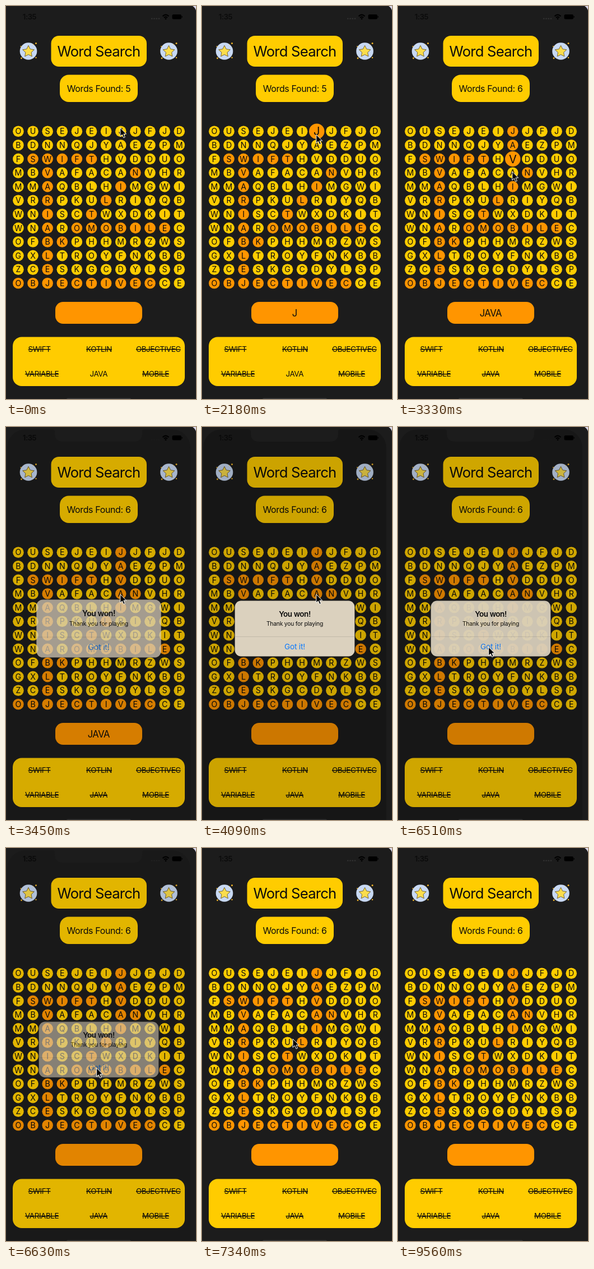
Recreate the animation shown at these times as an HTML page. Size 339 px wide and 700 px high, loop 9.61 s.

```html
<!DOCTYPE html>
<html lang="en">
<head>
<meta charset="utf-8">
<title>Word Search</title>
<style>
html, body { margin: 0; width: 100%; height: 100%; overflow: hidden; background: #1c1c1c; }
svg { display: block; width: 339px; height: 700px; }
text { font-family: Inter, "Liberation Sans", sans-serif; text-anchor: middle; letter-spacing: -.03em; fill: #0b0b0b; }
.struck { text-decoration: line-through; }
</style>
</head>
<body>
<svg id="stage" viewBox="0 0 339 700"></svg>
<script>
const LOOP = 9610, YELLOW = '#ffcc00', ORANGE = '#ff9500';
const stage = document.getElementById('stage');

function add(tag, attrs, parent = stage) {
  const el = document.createElementNS('http://www.w3.org/2000/svg', tag);
  for (const k in attrs) el.setAttribute(k, attrs[k]);
  parent.append(el);
  return el;
}
const box = (x, y, width, height, rx, fill, parent) => add('rect', {x, y, width, height, rx, fill}, parent);
function label(str, x, y, size, attrs = {}, parent) {
  const el = add('text', {x, y, 'font-size': size, ...attrs}, parent);
  el.textContent = str;
  return el;
}
const clamp = v => Math.max(0, Math.min(1, v));
const ramp = (t, start, length) => clamp((t - start) / length);
const smooth = p => p * p * (3 - 2 * p);

// Phone frame and status bar
add('path', {d: 'M333 0H339V8Q337.5 3 333 0Z', fill: '#d9d5e6'});
label('1:35', 42, 23.5, 13, {'font-weight': 600});
const signal = add('g', {fill: '#333'});
for (let i = 0; i < 4; i++) box(259 + i * 4.2, 21.5, 2.6, 2, .6, '#333', signal);
add('path', {d: 'M279.5 18.2Q285 13 290.5 18.2M282 20.8Q285 18 288 20.8', fill: 'none', stroke: '#000', 'stroke-width': 2});
add('circle', {cx: 285, cy: 22.8, r: 1.4});
box(296.5, 15, 16.5, 8.6, 2.5, '#000');
box(313.6, 17.8, 1.3, 3, .6, '#000');
box(108, 698.5, 115, 4, 2, '#3a3a3a');

// Star badges
function badge(x) {
  const g = add('g', {transform: `translate(${x} 80.5)`});
  add('circle', {r: 15.3, fill: '#c8d9f3'}, g);
  const pts = [...Array(10).keys()].map(i => {
    const a = i * Math.PI / 5 - Math.PI / 2, r = i % 2 ? 5.4 : 10.8;
    return [r * Math.cos(a), r * Math.sin(a) + .6].map(v => v.toFixed(1));
  });
  add('polygon', {points: pts.join(' '), fill: '#fbdd4c', stroke: '#6b5a2c', 'stroke-width': .9, 'stroke-linejoin': 'round'}, g);
  [[13.5, -14, 1.5], [-13.5, -8.5, 1], [-12.5, 12.5, 1.4], [13.5, 11.5, 1.2], [9, -12, .8]]
    .forEach(([cx, cy, r]) => add('circle', {cx, cy, r, fill: '#f0b429'}, g));
}
badge(40);
badge(290.5);

// Panels
box(80.5, 53, 170.5, 55, 14, YELLOW);
label('Word Search', 165.5, 90, 25.6);
box(96, 122.5, 139, 48.5, 16, YELLOW);
const score = label('', 165.5, 152.5, 15.9, {style: 'letter-spacing:-.02em'});
box(88, 527, 155, 39, 14, ORANGE);
const typed = label('', 165.3, 552.6, 16.6);
box(12, 589.5, 307, 87.5, 16, YELLOW);
const words = [['SWIFT', 59.5, 616], ['KOTLIN', 166, 616], ['OBJECTIVEC', 271.8, 616],
  ['VARIABLE', 64, 660], ['MOBILE', 267, 660], ['JAVA', 165.3, 660]]
  .map(([w, x, y]) => label(w, x, y, 13.4, {class: 'struck'}));
const java = words[5];

// Letter grid
const rows = `OUSEJEIJJFJD BDNNQJYAEZPM FSWIFTHVDDUO MBVAFACANVHR MMAQBLHIMGWI VRRPKULRIYQB
WNISCTWXDKIT WNAROMOBILEC OFBKPHHMRZWS GXLTROYFNKBB ZCESKGCDYLSP OBJECTIVECCE`.split(/\s+/);
const cells = rows.map((row, r) => [...row].map((ch, c) => {
  const x = 21.9 + c * 26.12, y = 223.2 + r * 24.6;
  const g = add('g', {});
  const disc = add('circle', {r: 9.8, fill: YELLOW}, g);
  label(ch, 0, 5.1, 14.2, {style: 'letter-spacing:0'}, g);
  const scale = s => g.setAttribute('transform', `translate(${x} ${y}) scale(${s})`);
  scale(1);
  return {disc, scale};
}));
// Words found so far: row, column, row step, column step, length
[[2, 1, 0, 1, 5], [3, 2, 1, 0, 8], [8, 3, -1, 1, 6], [7, 4, 0, 1, 7], [11, 0, 0, 1, 10]]
  .forEach(([r, c, dr, dc, n]) => {
    for (let i = 0; i < n; i++) cells[r + i * dr][c + i * dc].disc.setAttribute('fill', ORANGE);
  });

// Dimming of the screen around the notch
const shade = add('path', {d: 'M2 700V37A33 33 0 0 1 35 4H83q4 0 4 4v3q0 15 15 15H228q15 0 15-15v-3q0-4 4-4H296A33 33 0 0 1 329 37V700Z'});

// Alert
const alertBox = add('g', {});
box(58.7, 309.5, 213.6, 99, 11, '#dbd1be', alertBox);
const press = add('path', {d: 'M58.7 373.5H272.3V397.5a11 11 0 0 1-11 11H69.7a11 11 0 0 1-11-11Z', fill: '#000', 'fill-opacity': .06}, alertBox);
box(58.7, 373.2, 213.6, .7, 0, '#b9b1a2', alertBox);
label('You won!', 165.5, 338.3, 13.45, {'font-weight': 600}, alertBox);
label('Thank you for playing', 165.5, 354, 10.3, {style: 'letter-spacing:-.02em'}, alertBox);
label('Got it!', 165.5, 395.8, 13.6, {style: 'fill:#0a7aff;letter-spacing:-.015em'}, alertBox);

const pointer = add('path', {d: 'M0 0V15.2L3.5 12 6 17.6 8.5 16.5 6.1 11H10.8Z', fill: '#000', stroke: '#fff', 'stroke-width': 1, 'stroke-linejoin': 'round'});
// Pointer stops: time, x, y
const stops = [[0, 203.8, 217], [1800, 203.8, 217], [3330, 203.8, 295], [3450, 203.8, 298],
  [4090, 203.8, 298], [4650, 158, 407], [4910, 161, 401], [5870, 161, 401], [6150, 161.7, 392],
  [7339, 161.7, 392], [7340, 162, 340], [7820, 80, 0], [8120, 80, 0], [8420, 236, 702], [LOOP, 236, 702]];

function pointerAt(t) {
  const i = stops.findIndex(s => s[0] > t);
  const [t0, x0, y0] = stops[i - 1], [t1, x1, y1] = stops[i];
  const p = smooth(ramp(t, t0, t1 - t0));
  return [x0 + (x1 - x0) * p, y0 + (y1 - y0) * p];
}

// Each letter stays enlarged until the next one is picked
const picks = [1860, 2310, 2800, 3380];
const SOLVED = 3300, CLEARED = 3850;

function draw(t) {
  const solved = t >= SOLVED;
  score.textContent = 'Words Found: ' + (solved ? 6 : 5);
  java.setAttribute('class', solved ? 'struck' : '');
  const count = solved ? 4 : picks.filter(p => t >= p).length;
  typed.textContent = t < CLEARED ? 'JAVA'.slice(0, count) : '';

  picks.forEach((start, r) => {
    const cell = cells[r][7];
    cell.disc.setAttribute('fill', t >= start ? ORANGE : YELLOW);
    const next = picks[r + 1];
    cell.scale(next ? 1 + .4 * (ramp(t, start, 120) - ramp(t, next, 60)) : 1);
  });

  const shown = 1 - (1 - ramp(t, 3340, 390)) ** 5;
  const left = 1 - ramp(t, 6490, 320);
  shade.setAttribute('opacity', .2 * shown * left);
  signal.setAttribute('opacity', 1 - shown * left);
  alertBox.setAttribute('opacity', shown ** 1.6 * left);
  const s = 1 + .22 * (1 - shown);
  alertBox.setAttribute('transform', `translate(165.5 359) scale(${s}) translate(-165.5 -359)`);
  press.setAttribute('opacity', t >= 6330 && t < 6510 ? 1 : 0);

  pointer.setAttribute('transform', `translate(${pointerAt(t)})`);
}

const begin = performance.now();
function frame() {
  draw((performance.now() - begin) % LOOP);
  requestAnimationFrame(frame);
}
frame();
</script>
</body>
</html>
```
